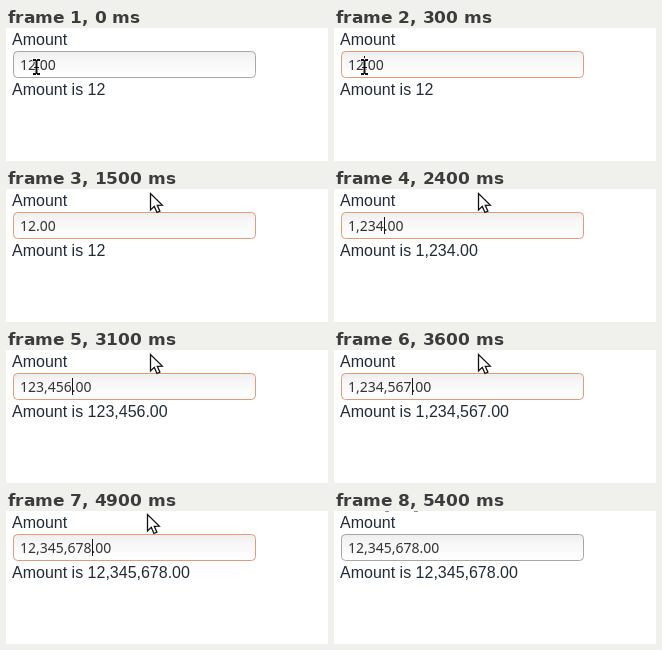
Write an HTML page with a canvas that moves like this. It is 322 px wide and 133 px high and loops after 5.5 s.

```html
<!DOCTYPE html>
<html lang="en">
<head>
<meta charset="utf-8">
<title>Amount field</title>
<style>
html, body { margin: 0; width: 100%; height: 100%; overflow: hidden; background: #fff; }
canvas { display: block; width: 322px; height: 133px; }
</style>
</head>
<body>
<canvas id="stage"></canvas>
<script>
const W = 322, H = 133, LOOP = 5500;
const canvas = document.getElementById('stage');
const ctx = canvas.getContext('2d');
const scale = window.devicePixelRatio || 1;
canvas.width = W * scale;
canvas.height = H * scale;

const LABEL_FONT = '16px "Liberation Sans", Arial, sans-serif';
const FIELD_FONT = '14px "Noto Sans", "Open Sans", sans-serif';

// Each track lists [start time, value]; values hold until the next entry.
const digits = [[0, '12'], [2100, '123'], [2400, '1234'], [2700, '12345'],
  [3100, '123456'], [3600, '1234567'], [4300, '12345678']];
const result = [[0, '12'], [2100, '123'], [2400, '1234'], [2800, '12345'],
  [3100, '123456'], [3600, '1234567'], [4300, '12345678']];
const focus = [[0, false], [300, true], [5300, false]];
const caret = [[0, false], [300, true], [1500, false], [2100, true],
  [3900, false], [4300, true], [5000, false]];
const pointer = [
  [0, { beam: true, x: 30, y: 31 }],
  [500, { beam: true, x: 46, y: 32 }],
  [600, { x: 112, y: 14 }],
  [700, { x: 144, y: 4 }],
  [4900, { x: 141, y: 3 }],
  [5000, { x: 115, y: -5 }],
  [5100, { x: 82, y: -14 }],
  [5300, { x: 74, y: -18 }],
  [5400, null]
];

function at(track, t) {
  let value = track[0][1];
  for (const [start, v] of track) if (t >= start) value = v;
  return value;
}

const group = s => s.replace(/\B(?=(\d{3})+$)/g, ',');

function text(str, x, y, font, color) {
  ctx.font = font;
  ctx.fillStyle = color;
  ctx.fillText(str, x, y);
}

function drawField(active) {
  const fill = ctx.createLinearGradient(0, 24, 0, 49);
  fill.addColorStop(0, '#eeeeee');
  fill.addColorStop(0.35, '#f7f7f7');
  fill.addColorStop(1, '#ffffff');
  ctx.beginPath();
  ctx.roundRect(7.5, 23.5, 242, 26, 4);
  ctx.fillStyle = fill;
  ctx.fill();
  ctx.strokeStyle = active ? '#dc9c80' : '#a9a6a3';
  ctx.lineWidth = 1;
  ctx.stroke();
}

function drawArrow(x, y) {
  const shape = [[0.5, 0.5], [0.5, 17], [4.3, 13.4], [7, 19.5], [9.9, 18.2],
    [7.3, 12.3], [12.3, 12.1]];
  ctx.beginPath();
  shape.forEach(([dx, dy]) => ctx.lineTo(x + dx, y + dy));
  ctx.closePath();
  ctx.fillStyle = '#fff';
  ctx.fill();
  ctx.strokeStyle = '#111';
  ctx.lineWidth = 1.3;
  ctx.stroke();
}

function drawBeam(x, y) {
  const bars = [[-3, 0, 3, 2], [1, 0, 3, 2], [-0.5, 1, 2, 14],
    [-3, 14, 3, 2], [1, 14, 3, 2], [-2, 8, 5, 1]];
  ctx.fillStyle = '#fff';
  bars.forEach(([dx, dy, w, h]) => ctx.fillRect(x + dx - 0.7, y + dy - 0.7, w + 1.4, h + 1.4));
  ctx.fillStyle = '#111';
  bars.forEach(([dx, dy, w, h]) => ctx.fillRect(x + dx, y + dy, w, h));
}

function draw(t) {
  ctx.setTransform(scale, 0, 0, scale, 0, 0);
  ctx.fillStyle = '#fff';
  ctx.fillRect(0, 0, W, H);

  const typed = group(at(digits, t));
  const shown = group(at(result, t));
  const suffix = shown === '12' ? '' : '.00';
  text('Amount', 6, 17, LABEL_FONT, '#222a38');
  text('Amount is ' + shown + suffix, 6, 67, LABEL_FONT, '#222a38');

  drawField(at(focus, t));
  text(typed + '.00', 14, 42, FIELD_FONT, '#333');
  if (at(caret, t)) {
    const x = Math.round(14 + ctx.measureText(typed).width);
    ctx.fillStyle = '#111';
    ctx.fillRect(x, 28, 1, 17);
  }

  const p = at(pointer, t);
  if (p) (p.beam ? drawBeam : drawArrow)(p.x, p.y);
  else {
    // Lower edges of what lies just above the visible area.
    ctx.fillStyle = '#8b8f96';
    ctx.fillRect(51, 0, 4, 1);
    ctx.fillRect(80, 0, 4, 1);
  }
}

function tick(now) {
  draw(now % LOOP);
  requestAnimationFrame(tick);
}
draw(0);
requestAnimationFrame(tick);
</script>
</body>
</html>
```
